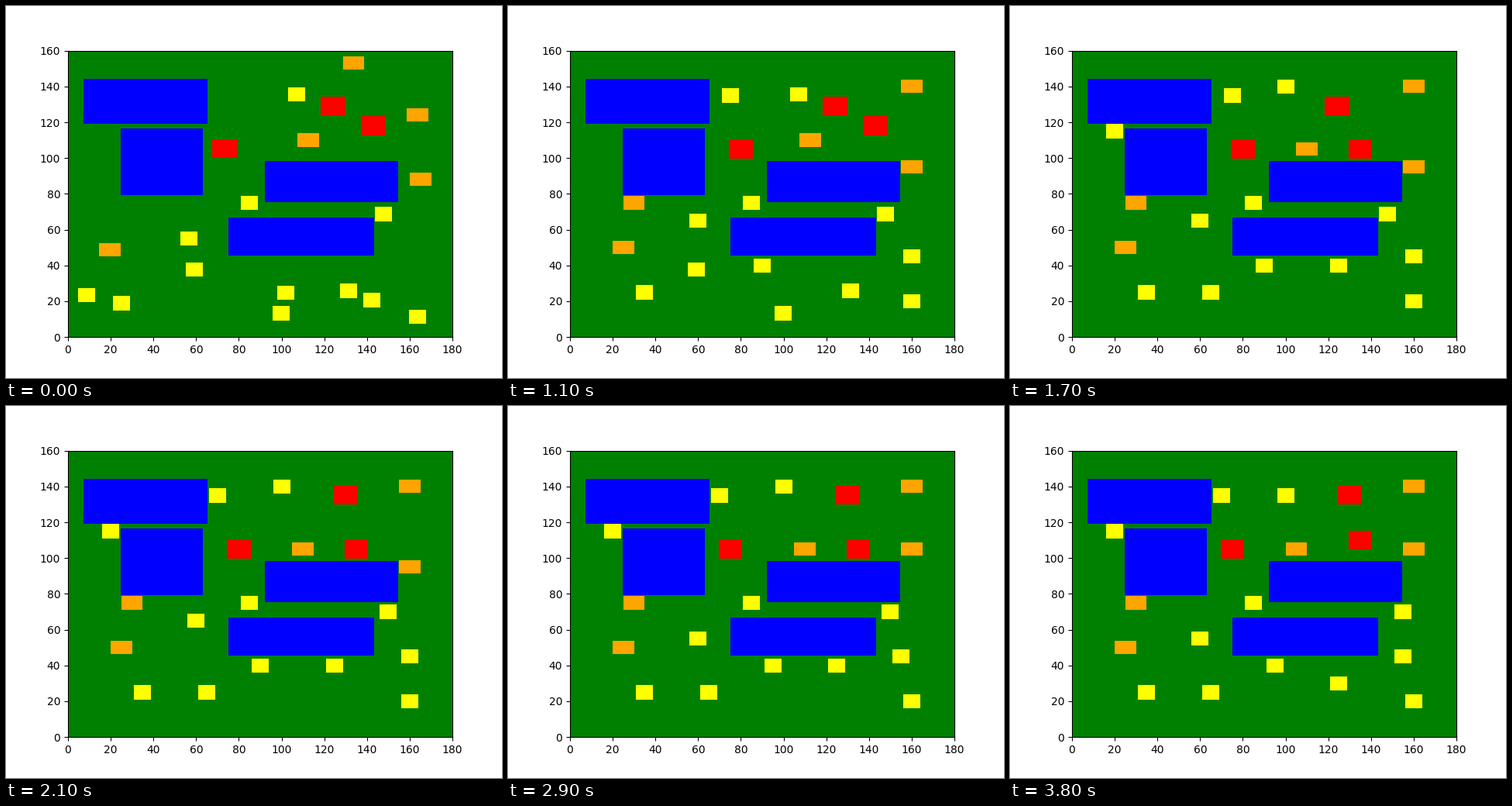
Animation of 640 by 480 pixels, one loop 3900 ms. Source, as a matplotlib script:

```python
import matplotlib.pyplot as plt
from matplotlib.animation import FuncAnimation
from matplotlib.patches import Rectangle

STEP_MS = 100
STEPS = 39
RED_START_WIDTH = 11.5

SIZES = {"yellow": (8, 8), "orange": (10, 7.5), "red": (11, 10.5)}

# Water as left, bottom, right, top.
WATER = [
    (7.26, 119.3, 65.3, 144.2),
    (24.7, 79.4, 63.1, 116.4),
    (92.2, 75.4, 154.6, 98.2),
    (75.1, 45.5, 143.5, 66.7),
]

# Houses in the order they take turns: colour, then the successive centres.
# Each is visited once per round; a repeated centre means it stays put.
HOUSES = [
    ("yellow", (8.7, 23.4), (75, 135), (70, 135)),
    ("orange", (133.8, 153.05), (30, 75), (30, 75)),
    ("yellow", (25, 19), (35, 25), (35, 25)),
    ("yellow", (56.6, 55), (60, 65), (60, 55)),
    ("yellow", (102, 24.7), (90, 40), (95, 40)),
    ("yellow", (163.7, 11.3), (160, 45), (155, 45)),
    ("orange", (165.1, 88.1), (160, 95), (160, 105)),
    ("orange", (163.6, 124.1), (160, 140), (160, 140)),
    ("red", (73.3, 105.3), (80, 105), (75, 105)),
    ("orange", (19.5, 48.7), (25, 50), (25, 50)),
    ("yellow", (142.3, 20.7), (160, 20), (160, 20)),
    ("red", (143, 118), (135, 105), (135, 110)),
    ("orange", (112.4, 110.1), (110, 105), (105, 105)),
    ("yellow", (131.4, 25.9), (125, 40), (125, 30)),
    ("yellow", (99.8, 13.3), (20, 115), (20, 115)),
    ("yellow", (107, 135.5), (100, 140), (100, 135)),
    ("yellow", (59.2, 37.8), (65, 25), (65, 25)),
    ("yellow", (147.8, 68.8), (150, 70), (155, 70)),
    ("red", (124, 129), (130, 135), (130, 135)),
    ("yellow", (85, 75), (85, 75), (85, 75)),
]

fig, ax = plt.subplots(figsize=(6.4, 4.8), dpi=100)
ax.set_facecolor("green")
ax.set_xlim(0, 180)
ax.set_ylim(0, 160)
ax.set_xticks(range(0, 181, 20))
ax.set_yticks(range(0, 161, 20))


def add_box(color, x=0, y=0, w=0, h=0):
    return ax.add_patch(Rectangle((x, y), w, h, facecolor=color, linewidth=0))


for left, bottom, right, top in WATER:
    add_box("blue", left, bottom, right - left, top - bottom)

boxes = [add_box(house[0]) for house in HOUSES]


def moves_done(turn, step):
    """How many times the house with this turn has been visited."""
    return max(0, (step - 1 - turn) // len(HOUSES) + 1)


def update(step):
    for turn, (box, (color, *centres)) in enumerate(zip(boxes, HOUSES)):
        done = moves_done(turn, step)
        x, y = centres[done]
        w, h = SIZES[color]
        if color == "red" and done == 0:
            w = RED_START_WIDTH
        box.set_bounds(x - w / 2, y - h / 2, w, h)
    return boxes


anim = FuncAnimation(fig, update, frames=STEPS, interval=STEP_MS,
                     init_func=lambda: update(0), repeat=True,
                     repeat_delay=0, blit=False)
plt.show()
```
